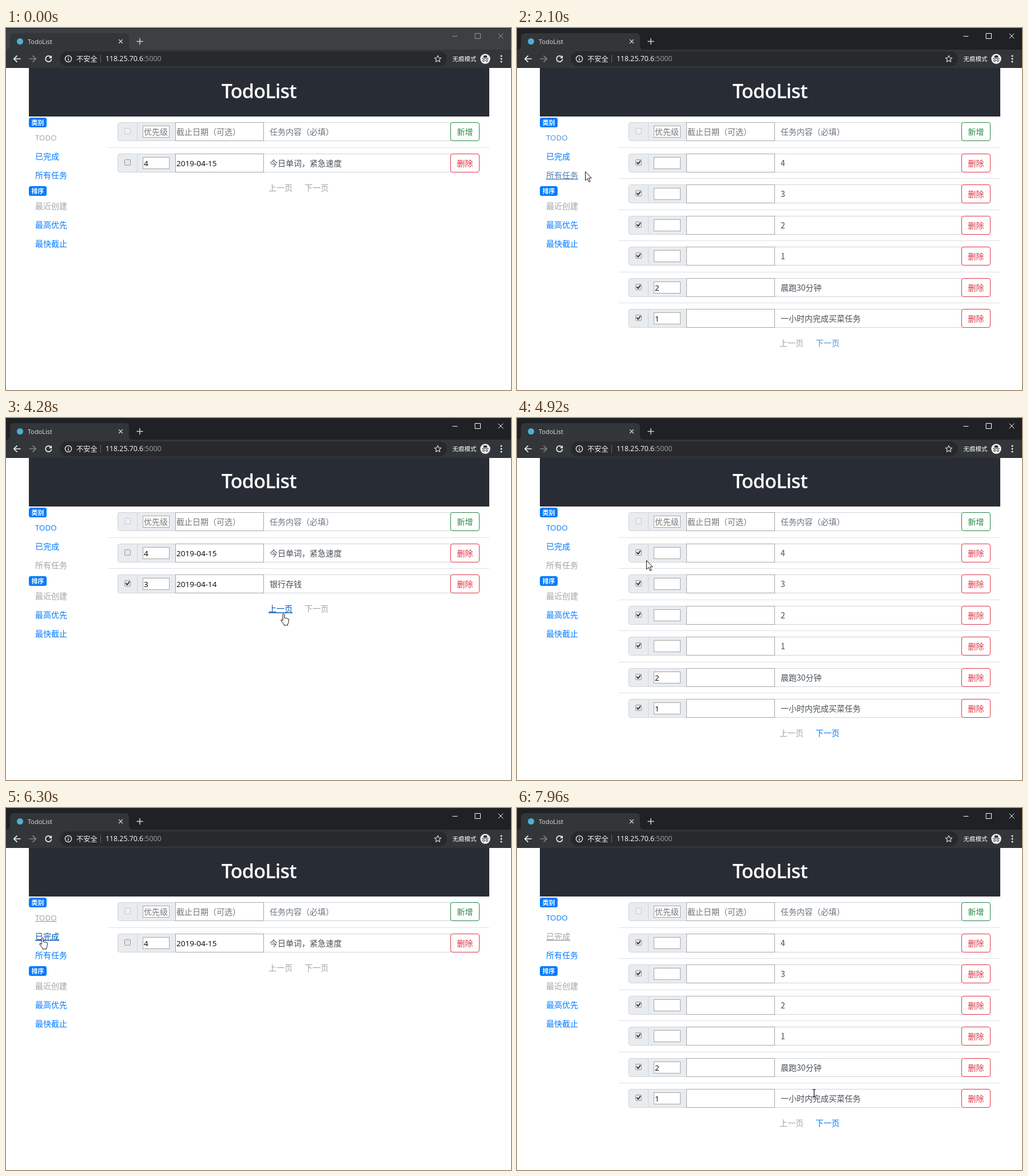
An HTML page for the animation above (8 s loop, 883 by 634 pixels).

```html
<!DOCTYPE html>
<html lang="zh-CN">
<head>
<meta charset="utf-8">
<title>TodoList</title>
<style>
  html, body { margin: 0; width: 100%; height: 100%; overflow: hidden; background: #fff; }
  svg { display: block; width: 883px; height: 634px; font: 14px "Noto Sans CJK SC", "Noto Sans CJK", "Noto Sans", sans-serif; }
  text { white-space: pre; }
  .latin { font-family: "Open Sans", "Noto Sans", sans-serif; }
  .line { fill: none; stroke-linecap: round; stroke-linejoin: round; }
</style>
</head>
<body>
<svg id="stage" viewBox="0 0 883 634" xmlns="http://www.w3.org/2000/svg"></svg>
<script>
const LOOP = 8000, STEP = 74, FADE = 150, PITCH = 54.45;
const GREY = [159, 165, 170], BLUE = [0, 123, 255], NAVY = [0, 86, 179];

// Pointer moves: the screen refreshes every STEP while one runs and rests between them
const entry = [854, 620];
const moves = [
  { at: 300, steps: 9, to: [[280, 232], [149, 246]] },
  { at: 1110, steps: 5, to: [[90, 254]] },
  { at: 1860, steps: 10, to: [[121, 252], [400, 480], [535, 566]] },
  { at: 2720, steps: 10, to: [[542, 552]] },
  { at: 3570, steps: 9, to: [[540, 345], [486, 343]] },
  { at: 4440, steps: 10, to: [[87, 200]] },
  { at: 5300, steps: 10, to: [[87, 200], [48, 227]] },
  { at: 6130, steps: 3, to: [[70, 227]] },
  { at: 6530, steps: 10, to: [[641, 520], [67, 235]] },
  { at: 7400, steps: 7, to: [[67, 235], [520, 500]] }
];
moves.forEach((m, i) => m.stops = [i ? moves[i - 1].stops.at(-1) : entry, ...m.to]);

// Rows: done, priority, date, content
const words = [0, '4', '2019-04-15', '今日单词，紧急速度'];
const bank = [1, '3', '2019-04-14', '银行存钱'];
const six = [...['4', '3', '2', '1'].map(n => [1, '', '', n]),
  [1, '2', '', '晨跑30分钟'], [1, '1', '', '一小时内完成买菜任务']];
const views = [
  { at: 0, rows: [words], tab: 0 },
  { at: 2020, rows: six, tab: 2, focus: 2, next: true },
  { at: 3030, rows: [words, bank], tab: 2, prev: true },
  { at: 4520, rows: six, tab: 2, next: true },
  { at: 5305, rows: [words], tab: 0, focus: 0 },
  { at: 7540, rows: six, tab: 1, focus: 1, next: true }
];

const side = (labels, top) => labels.map((label, i) => ({ label, x: 51, y: top + 33 * i }));
const links = [
  ...side(['TODO', '已完成', '所有任务'], 192),
  ...side(['最近创建', '最高优先', '最快截止'], 312),
  { label: '上一页', x: 459, y: 280 }, { label: '下一页', x: 522, y: 280 }
];

const rect = (x, y, w, h, fill, more = '') => `<rect x="${x}" y="${y}" width="${w}" height="${h}" fill="${fill}" ${more}/>`;
const box = (x, y, w, h, fill, stroke, rx = 0) => rect(x + .5, y + .5, w - 1, h - 1, fill, `stroke="${stroke}" rx="${rx}"`);
const disc = (x, y, r, fill, more = '') => `<circle cx="${x}" cy="${y}" r="${r}" fill="${fill}" ${more}/>`;
const text = (x, y, s, fill, more = '') => `<text x="${x}" y="${y}" fill="${fill}" ${more}>${s}</text>`;
const latin = size => `class="latin" font-size="${size}"`;
const line = (d, stroke, w = 1) => `<path class="line" d="${d}" stroke="${stroke}" stroke-width="${w}"/>`;
const rowTop = i => Math.round(165.4 + PITCH * i);

function row(i, [done, level, date, content], head) {
  const y = rowTop(i), base = y + 22, font = head ? '' : latin(13.5);
  const dark = head ? '#757575' : '#000', body = head ? '#6c757d' : '#495057';
  const tone = head ? '#238842' : '#dc3545';
  return box(195, y, 110, 33, '#e9ecef', '#ced4da', 3.5)
    + rect(229, y + 1, 1, 31, '#ced4da')
    + box(207, y + 10, 11, 11, head ? '#eef0f2' : '#e6e6e6', head ? '#c6c9cc' : '#999', 1.5)
    + (done ? line(`M209.7 ${y + 15.6}l2.2 2.4l3.6-5`, '#333', 1.9) : '')
    + box(239, y + 6, 47, 21, '#fff', '#a6a6a6') + text(241, base, level, dark, font)
    + box(449, y, 329, 33, '#fff', '#ced4da') + text(461, base, content, body)
    + box(296, y, 155, 33, '#fff', '#a6a6a6') + text(298, base, date, dark, font)
    + box(777, y, 51, 33, '#fff', tone, 3.5) + text(788.5, base, head ? '新增' : '删除', tone);
}

const badge = (y, label) => rect(40, y, 31, 17, '#007bff', 'rx="3.5"')
  + text(44.5, y + 13, label, '#fff', 'font-size="11" font-weight="700"');

const pale = '#f1f3f4';
const tabStrip = rect(0, 0, 883, 40, '#3c4043', 'id="strip"') + rect(0, 0, 883, 1, '#20222b')
  + '<path d="M0 38Q7 38 7 31V16Q7 9 14 9H208Q215 9 215 16V31Q215 38 222 38Z" fill="#323639"/>'
  + disc(24.5, 23.5, 5.5, '#4bb1d3')
  + text(38, 27.5, 'TodoList', '#e0e2e4', latin(11))
  + line('M197.5 20.5l6 6m0-6l-6 6', '#d0d2d4', 1.3)
  + line('M229 23.5h10m-5-5v10', '#d0d2d4', 1.5)
  + '<g id="controls">' + line('M781 14.5h8M820.5 9.5h9v9h-9zM861 10l8 8m0-8l-8 8', 'currentColor') + '</g>';

const toolbar = rect(0, 38, 883, 32, '#323639')
  + line('M25 54H14m5-5.2L13.7 54l5.3 5.2', pale, 1.7)
  + line('M41 54h11m-5-5.2l5.3 5.2l-5.3 5.2', '#7f8386', 1.7)
  + line('M78.6 51a5.2 5.2 0 1 0 .8 4.2', pale, 1.7)
  + `<path d="M80 48v5h-5z" fill="${pale}"/>`
  + rect(94, 41, 677, 26, '#27292c', 'rx="13"')
  + disc(109, 54, 5.6, 'none', `stroke="${pale}" stroke-width="1.3"`)
  + line('M109 51v.2M109 53.8v3', pale, 1.4)
  + text(123, 58.5, '不安全', pale, 'font-size="12.3"') + rect(165, 47, 1, 14, '#64676a')
  + text(174, 58.3, '118.25.70.6<tspan fill="#9aa0a6">:5000</tspan>', '#fff', latin(12.3))
  + line('M755 48.3l1.7 3.7l4 .4l-3 2.8l.9 4l-3.6-2.1l-3.6 2.1l.9-4l-3-2.8l4-.4z', '#d5d7d9', 1.2)
  + text(780.5, 58, '无痕模式', '#fff', 'font-size="10.5"')
  + disc(838, 54, 8.7, pale)
  + '<path d="M832 53h12v1h-12zM834.3 52l1.2-4h5l1.2 4z" fill="#323639"/>'
  + [835.2, 840.8].map(x => disc(x, 57, 1.7, 'none', 'stroke="#323639"')).join('')
  + [49, 54, 59].map(y => disc(866, y, 1.5, pale)).join('');

const page = rect(40, 70, 805, 85, '#282c34')
  + text(442.3, 123, 'TodoList', '#fff', latin(34) + ' font-weight="600" text-anchor="middle" letter-spacing="-.8"')
  + badge(157, '类别') + badge(277, '排序')
  + row(0, [0, '优先级', '截止日期（可选）', '任务内容（必填）'], true)
  + '<g id="rows"></g>'
  + links.map((l, i) => `<g class="link">${text(l.x, l.y + 5, l.label, 'inherit', i ? '' : latin(13.3))}</g>`).join('');

const solid = d => `<path d="${d}" fill="#fff" stroke="#111" stroke-linejoin="round"/>`;
const pointer = '<g id="pointer">'
  + solid('M0 0V15.5L3.6 12.2L6.2 18L8.6 17L6 11.3H10.7Z')
  + solid('M-1.5 1.5Q0-1 1.5 1.5V8Q3 6.5 4 8.5Q5.7 7.3 6.5 9Q8.7 8.5 8.8 10.5V14Q8.5 17 7 18.5V20.5H.5V19L-4.5 12.5Q-5 10.5-3.5 10.5L-1.5 12.5Z')
  + line('M-2.5-6.5H2.5M0-6.5V6.5M-2.5 6.5H2.5', '#111', 1.2)
  + '</g>';

const $ = id => document.getElementById(id);
$('stage').innerHTML = tabStrip + toolbar + page + pointer;
const linkEls = [...document.querySelectorAll('.link text')];
const shapes = [...$('pointer').children];
links.forEach((l, i) => l.right = l.x + (i ? l.label.length * 14 : 38));

const latest = (list, t) => list.filter(e => e.at <= t).at(-1);

function snap(t) {
  const m = latest(moves, t);
  return m ? m.at + STEP * Math.min(m.steps, Math.floor((t - m.at) / STEP)) : 0;
}

// Every leg of a move takes the same time and eases in and out
function pointAt(t) {
  const m = latest(moves, t);
  if (!m) return [-99, -99];
  const legs = m.stops.length - 1;
  const k = Math.min(1, (t - m.at) / (STEP * m.steps)) * legs;
  const i = Math.min(legs - 1, Math.floor(k)), u = k - i, ease = u * u * (3 - 2 * u);
  return m.stops[i].map((a, j) => a + (m.stops[i + 1][j] - a) * ease);
}

const drop = (v, i) => i > 5 ? PITCH * (v.rows.length - 1) : 0;

function enabled(v, i) {
  if (i < 3) return v.tab !== i;
  return i < 6 ? i > 3 : !!(i === 6 ? v.prev : v.next);
}

const hovered = (v, [x, y]) => links.findIndex((l, i) =>
  x > l.x - 11 && x < l.right + 11 && Math.abs(y - l.y - drop(v, i)) < 16.5);

function tint(t, i) {
  const v = latest(views, t);
  if (!enabled(v, i)) return GREY;
  return hovered(v, pointAt(t)) === i ? NAVY : BLUE;
}

// Averaging the recent past gives a linear colour fade
function faded(t, i) {
  const n = 10, sum = [0, 0, 0];
  for (let k = 0; k < n; k++)
    tint(Math.max(0, t - FADE * k / n), i).forEach((c, j) => sum[j] += c / n);
  return `rgb(${sum.map(Math.round)})`;
}

// 0 arrow, 1 hand, 2 text bar
function cursorKind(v, [x, y], hover) {
  if (hover >= 0) return enabled(v, hover) ? 1 : 0;
  for (let i = 0; i <= v.rows.length; i++) {
    const dy = y - rowTop(i);
    if (dy < 0 || dy > 33) continue;
    if (x > 777 && x < 828) return 1;
    if (x > 296 && x < 777 || x > 239 && x < 286 && dy > 6 && dy < 27) return 2;
  }
  return 0;
}

let shown;
function render(time) {
  const t = snap(time), v = latest(views, t), p = pointAt(t), hover = hovered(v, p);
  if (shown !== v) {
    shown = v;
    $('rows').innerHTML = v.rows.map((r, i) =>
      rect(178, Math.round(208.7 + PITCH * i), 667, 1, '#dfe0e1') + row(i + 1, r)).join('');
  }
  const awake = t >= 1860;
  $('strip').setAttribute('fill', awake ? '#202124' : '#3c4043');
  $('controls').style.color = awake ? '#fff' : '#96999c';
  linkEls.forEach((el, i) => {
    el.setAttribute('y', links[i].y + 5 + drop(v, i));
    el.setAttribute('fill', faded(t, i));
    el.style.textDecoration = hover === i || v.focus === i ? 'underline' : 'none';
  });
  const kind = cursorKind(v, p, hover);
  shapes.forEach((s, i) => s.style.display = i === kind ? '' : 'none');
  $('pointer').setAttribute('transform', `translate(${p.map(n => Math.round(n) - .5)})`);
}

const start = performance.now();
function tick() {
  render((performance.now() - start) % LOOP);
  requestAnimationFrame(tick);
}
tick();
</script>
</body>
</html>
```
